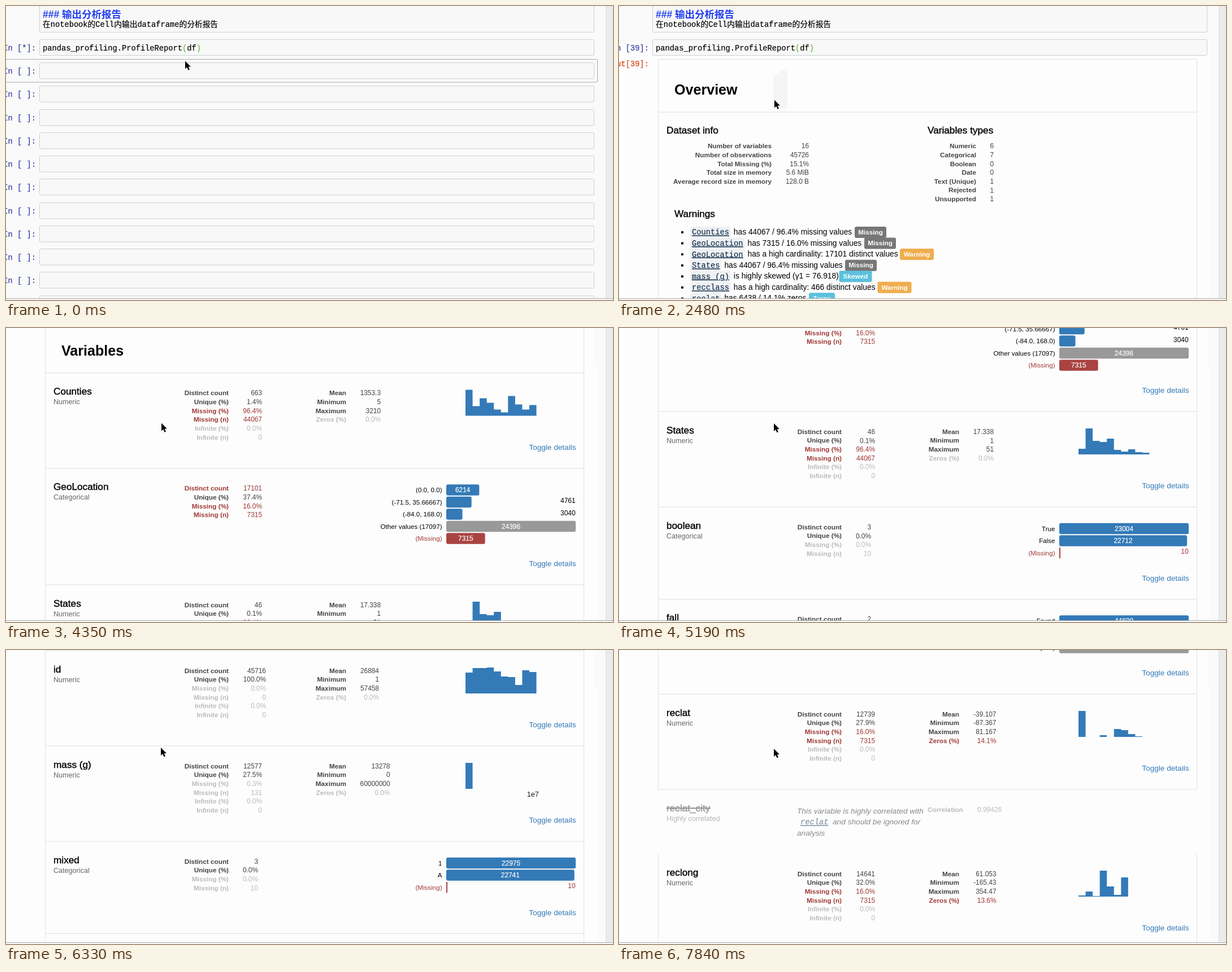
An HTML page for the animation above (7.99 s loop, 1074 px wide and 521 px high).

```html
<!DOCTYPE html>
<html lang="zh-CN">
<head>
<meta charset="utf-8">
<title>Profile report</title>
<style>
html, body { margin: 0; width: 100%; height: 100%; overflow: hidden; background: #fafafa; }
svg { display: block; width: 1074px; height: 521px; }
text { font-family: "Liberation Sans", "Noto Sans CJK SC", "Noto Sans CJK", sans-serif; white-space: pre; }
.mono { font-family: "Liberation Mono", "Noto Sans CJK SC", "Noto Sans CJK", monospace; }
.medium { stroke: currentColor; stroke-width: .4px; }
.firm { stroke: currentColor; stroke-width: .2px; }
</style>
</head>
<body>
<svg id="stage" viewBox="0 0 1074 521"></svg>
<script>
const LOOP = 7990, REPORT_AT = 1980;
const BLUE = '#337ab7', RED = '#a03836', PALE = '#bbb', DARK = '#444';
const TONES = { k: DARK, r: RED, g: PALE };

// y is the middle of the capitals
const text = (x, y, str, size, { fill = '#000', anchor = 'start', weight = 400, cls = '', extra = '' } = {}) =>
  `<text x="${x}" y="${y + size * .36}" font-size="${size}" fill="${fill}" color="${fill}" text-anchor="${anchor}" font-weight="${weight}" class="${cls}" ${extra}>${str}</text>`;
const rect = (x, y, w, h, fill, extra = '') =>
  `<rect x="${x}" y="${y}" width="${w}" height="${h}" fill="${fill}" ${extra}/>`;
const line = (x1, y1, x2, y2, stroke = '#dfdfdf') =>
  `<path d="M${x1} ${y1}L${x2} ${y2}" stroke="${stroke}" fill="none"/>`;
const divider = y => line(70, y, 1022, y);
const mono = (x, y, str, opts = {}) => text(x, y, str, 13.72, { ...opts, cls: 'mono firm' });
const heading = (x, y, str) => text(x, y, str, 17.2, { cls: 'medium' });
const inputBox = (y, h) => rect(59.5, y, 981, h, '#f8f8f8', 'rx="2" stroke="#cfcfcf"');
const prompt = (y, str, fill = '#303f9f') => mono(53, y, str, { fill, anchor: 'end' });

function table(labelX, valueX, y, labels, values, tones) {
  return values.map((value, i) => {
    const rowY = y + i * 15.65, fill = TONES[tones[i]];
    return text(labelX, rowY, labels[i], 11.75, { fill, anchor: 'end', weight: 700 }) +
      text(valueX, rowY, value, 11.9, { fill, anchor: 'end' });
  }).join('');
}

// ---- notebook cells ----
function notebookTop() {
  return inputBox(-20.5, 67) +
    text(65, 14.5, '### 输出分析报告', 17.5, { fill: '#2440f0', weight: 700 }) +
    mono(65, 32.5, '在notebook的Cell内输出dataframe的分析报告') +
    inputBox(59.5, 28) +
    mono(65, 74, 'pandas_profiling.ProfileReport<tspan fill="#4fae3a" stroke="none">(</tspan>df<tspan fill="#4fae3a" stroke="none">)</tspan>');
}

function emptyCells() {
  let out = prompt(74, 'In [*]:') + rect(-10, 94.5, 1056.5, 40.5, '#fafafa', 'rx="2" stroke="#ababab"');
  for (let i = 0; i < 11; i++) {
    const y = 100.5 + Math.round(i * 41.25);
    out += inputBox(y, 28.5) + prompt(y + 14.5, 'In [ ]:');
  }
  return out;
}

// ---- report overview ----
const BADGES = { Missing: ['#777', 56], Warning: ['#f0ad4e', 60], Skewed: ['#5bc0de', 58], Zeros: ['#5bc0de', 46], Rejected: [BLUE, 63] };
const WARNINGS = [
  ['Counties', 'has 44067 / 96.4% missing values', 'Missing', 417],
  ['GeoLocation', 'has 7315 / 16.0% missing values', 'Missing', 434],
  ['GeoLocation', 'has a high cardinality: 17101 distinct values', 'Warning', 497],
  ['States', 'has 44067 / 96.4% missing values', 'Missing', 400],
  ['mass (g)', 'is highly skewed (γ1 = 76.918)', 'Skewed', 389.5],
  ['recclass', 'has a high cardinality: 466 distinct values', 'Warning', 457.5],
  ['reclat', 'has 6438 / 14.1% zeros', 'Zeros', 336],
  ['reclat', 'has 7315 / 16.0% missing values', 'Missing', 392],
  ['reclat_city', 'is highly correlated with', 'Rejected', 520.5],
  ['reclong', 'has 6214 / 13.6% zeros', 'Zeros', 343.5],
  ['reclong', 'has 7315 / 16.0% missing values', 'Missing', 400.5],
  ['year', 'is an unsupported type, check if it needs cleaning or further analysis', 'Warning', 590],
];
const token = (x, y, name) =>
  rect(x - 3, y - 9.5, name.length * 8.23 + 6, 19, '#eff1f3', 'rx="3"') +
  mono(x, y, name, { fill: '#17324f', extra: 'text-decoration="underline"' });

function warning([name, message, badge, badgeX], i) {
  const y = 400 + i * 19.56, [color, width] = BADGES[badge];
  let out = `<circle cx="112" cy="${y + 1}" r="2.2"/>` + token(129, y + .5, name) +
    text(129 + name.length * 8.23 + 8, y, message, 13.8);
  if (badge === 'Rejected') out += token(380, y + .5, 'reclat') + text(436, y, '(ρ = 0.99426)', 13.8);
  return out + rect(badgeX, y - 9, width, 20, color, 'rx="3"') +
    text(badgeX + width / 2, y + .5, badge, 11.75, { fill: '#fff', anchor: 'middle', weight: 700 });
}

function overview() {
  const info = ['Number of variables', 'Number of observations', 'Total Missing (%)', 'Total size in memory', 'Average record size in memory'];
  const types = ['Numeric', 'Categorical', 'Boolean', 'Date', 'Text (Unique)', 'Rejected', 'Unsupported'];
  return divider(94.5) + text(98, 148, 'Overview', 25.1, { weight: 700 }) + divider(188) +
    heading(84, 220, 'Dataset info') + heading(546, 220, 'Variables types') +
    table(270, 336, 248, info, ['16', '45726', '15.1%', '5.6 MiB', '128.0 B'], 'kkkkk') +
    table(632, 663, 248, types, [...'6700111'], 'kkkkkkk') +
    heading(98, 368, 'Warnings') + WARNINGS.map(warning).join('') +
    rect(70, 660.7, 952, 1.6, '#ddd') + text(98, 715.5, 'Variables', 25.1, { weight: 700 });
}

// ---- report variables ----
const COUNTS = ['Distinct count', 'Unique (%)', 'Missing (%)', 'Missing (n)', 'Infinite (%)', 'Infinite (n)'];
const RANGE = ['Mean', 'Minimum', 'Maximum', 'Zeros (%)'];

const title = (y, name, kind) => heading(84, y + 32.5, name) +
  text(84, y + 51, kind, 12.6, { fill: '#666' });
const toggle = y => text(1008.5, y, 'Toggle details', 13.6, { fill: BLUE, anchor: 'end' });

// One outline for all bars, so that no seams show between them
function histogram(bottom, heights) {
  const steps = heights.map((h, i) => `V${bottom - h}H${813 + (i + 1) * 12.55}`).join('');
  return `<path d="M813 ${bottom}${steps}V${bottom}Z" fill="${BLUE}"/>`;
}

const numeric = (name, countX, counts, tones, rangeX, range, rangeTones, heights, scale = '') => ({
  height: 169,
  draw: y => title(y, name, 'Numeric') +
    table(394, countX, y + 35.5, COUNTS, counts.split(' '), tones) +
    table(602, rangeX, y + 35.5, RANGE, range.split(' '), rangeTones) +
    histogram(y + 76, heights) +
    (scale && text(943, y + 85.5, scale, 12.8, { fill: '#222', anchor: 'end' })) + toggle(y + 131.5),
});

function categorical(name, countX, counts, tones, bars) {
  const last = 38.5 + (bars.length - 1) * 21.5;
  const max = Math.max(...bars.map(bar => bar[1]));
  const drawBar = ([label, count], top, i) => {
    const y = top + 38.5 + i * 21.5, width = Math.max(2, count / max * 229);
    const missing = label === '(Missing)';
    const color = missing ? '#a94442' : label.startsWith('Other') ? '#999' : BLUE;
    return text(771.5, y, label, 11.6, { fill: missing ? RED : '#000', anchor: 'end' }) +
      rect(779, y - 9.75, width, 19.5, color, `rx="${Math.min(3, width / 3)}"`) +
      (width > 50 ? text(779 + width / 2, y, count, 11.9, { fill: '#fff', anchor: 'middle', cls: 'firm' })
        : text(1007.5, y - 2.7, count, 11.9, { fill: missing ? RED : '#000', anchor: 'end' }));
  };
  return {
    height: last + 82,
    draw: y => title(y, name, 'Categorical') +
      table(394, countX, y + 35.5, COUNTS, counts.split(' '), tones) +
      bars.map((bar, i) => drawBar(bar, y, i)).join('') + toggle(y + last + 44.5),
  };
}

const unique = {
  height: 150,
  draw: y => title(y, 'name', 'Categorical, Unique') +
    [[315, 'First 3 values', 'Stone Hill'], [546, 'Last 3 values', 'Grey Field']].map(([x, label, value]) =>
      text(x, y + 35.5, label, 11.75, { fill: DARK, weight: 700 }) +
      [1, 2, 3].map(n => text(x, y + 35.5 + n * 15.65, `${value} ${n}`, 11.9, { fill: DARK })).join('')).join('') +
    toggle(y + 112.5),
};

const rejected = {
  height: 114,
  open: true,
  draw: y => {
    const note = (x, dy, str) => text(x, y + dy, str, 13.7, { fill: '#888', extra: 'font-style="italic"' });
    return rect(69, y + 1, 955, 113, '#fdfdfd') +
      text(84, y + 32.5, 'reclat_city', 17.2, { fill: '#999', cls: 'medium', extra: 'text-decoration="line-through"' }) +
      text(84, y + 51, 'Highly correlated', 12.6, { fill: '#b5b5b5' }) +
      note(315, 38, 'This variable is highly correlated with') +
      mono(321, y + 57.5, 'reclat', { fill: '#8490a0', extra: 'font-style="italic" text-decoration="underline"' }) +
      note(378, 57.5, 'and should be ignored for') + note(315, 77, 'analysis') +
      text(546, y + 35.5, 'Correlation', 11.75, { fill: PALE, weight: 700 }) +
      text(677, y + 35.5, '0.99426', 11.9, { fill: PALE, anchor: 'end' });
  },
};

const VARIABLES = [
  numeric('Counties', 453, '663 1.4% 96.4% 44067 0.0% 0', 'kkrrgg', 663, '1353.3 5 3210 0.0%', 'kkkg', [46, 17, 31, 23, 11, 6, 35, 20, 11, 19]),
  categorical('GeoLocation', 453, '17101 37.4% 16.0% 7315', 'rkrr',
    [['(0.0, 0.0)', 6214], ['(-71.5, 35.66667)', 4761], ['(-84.0, 168.0)', 3040], ['Other values (17097)', 24396], ['(Missing)', 7315]]),
  numeric('States', 453, '46 0.1% 96.4% 44067 0.0% 0', 'kkrrgg', 663, '17.338 1 51 0.0%', 'kkkg', [10, 46, 24, 22, 28, 8, 5, 9, 4, 3]),
  categorical('boolean', 446, '3 0.0% 0.0% 10', 'kkgg', [['True', 23004], ['False', 22712], ['(Missing)', 10]]),
  categorical('fall', 446, '2 0.0% 0.0% 0', 'kkgg', [['Found', 44609], ['Fell', 1117]]),
  numeric('id', 460, '45716 100.0% 0.0% 0 0.0% 0', 'kkgggg', 660, '26884 1 57458 0.0%', 'kkkg', [37, 45, 45, 46, 39, 30, 29, 15, 41, 38]),
  numeric('mass (g)', 453, '12577 27.5% 0.3% 131 0.0% 0', 'kkgggg', 679.5, '13278 0 60000000 0.0%', 'kkkg', [46], '1e7'),
  categorical('mixed', 446, '3 0.0% 0.0% 10', 'kkgg', [['1', 22975], ['A', 22741], ['(Missing)', 10]]),
  unique,
  categorical('nametype', 446, '2 0.0% 0.0% 0', 'kkgg', [['Valid', 45651], ['Relict', 75]]),
  categorical('recclass', 446, '466 1.0% 0.0% 0', 'rkgg', [['L6', 8287], ['H5', 7143], ['L5', 4797], ['Other values (463)', 25499]]),
  numeric('reclat', 453, '12739 27.9% 16.0% 7315 0.0% 0', 'kkrrgg', 667.5, '-39.107 -87.367 81.167 14.1%', 'kkkr', [46, 0, 0, 3, 0, 14, 12, 5, 1]),
  rejected,
  numeric('reclong', 453, '14641 32.0% 16.0% 7315 0.0% 0', 'kkrrgg', 667.5, '61.053 -165.43 354.47 13.6%', 'kkkr', [2, 9, 1, 46, 18, 3, 34]),
];

function report() {
  let y = 755;
  const sections = VARIABLES.map(section => {
    const drawn = section.draw(y);
    y += section.height;
    return drawn + (section.open ? '' : divider(y));
  });
  return prompt(74, 'In [39]:') + prompt(102.5, 'Out[39]:', '#d84315') +
    line(69.5, 94, 69.5, y, '#e2e2e2') + line(1022.5, 94, 1022.5, y, '#e2e2e2') +
    overview() + divider(755) + sections.join('');
}

// ---- stage ----
document.getElementById('stage').innerHTML =
  rect(0, 0, 1074, 521, '#fafafa') +
  `<g id="paper">${rect(0, 68, 1047, 450, '#fdfdfd')}</g>` +
  `<g id="paperTop">${rect(0, 0, 1041, 90, '#fdfdfd')}</g>` +
  `<g id="page">${notebookTop()}<g id="cells">${emptyCells()}</g><g id="report">${report()}</g></g>` +
  '<path id="trail" d="M284 115H298V182H273V122H284Z" fill="#f5f5f5"/>' +
  rect(1061, 0, 13, 518, '#ebebeb') + line(1061.5, 0, 1061.5, 518, '#ddd') +
  rect(0, 518, 1074, 3, '#fcfcfc') + line(0, 518.5, 1074, 518.5, '#a6a6a6') +
  '<path id="cursor" d="M0 0V14L3.2 11L5.5 16.3L7.9 15.3L5.7 10.3L9.9 10Z" stroke="#fff" stroke-width="1.2" paint-order="stroke"/>';

const part = Object.fromEntries(['paper', 'paperTop', 'page', 'cells', 'report', 'trail', 'cursor']
  .map(id => [id, document.getElementById(id)]));

// Bursts: start, end, number of steps, value reached
const SCROLL = [
  [2600, 3030, 6, 192.5], [3480, 3900, 5, 652.7], [4350, 4810, 6, 960], [5190, 5680, 6, 1262.5], [6040, 6330, 4, 1604],
  [6480, 6480, 1, 1609], [6870, 7140, 4, 2215], [7280, 7400, 2, 2250], [7660, 7840, 3, 2505.5],
];
const CURSOR_X = [[120, 240, 2, 314], [660, 960, 6, 287], [2340, 2340, 1, 286], [2480, 2480, 1, 275], [5190, 5190, 1, 274]];
const CURSOR_Y = [[660, 960, 6, 107], [2340, 2340, 1, 115], [2480, 2480, 1, 166.5], [4350, 4350, 1, 168.5],
  [5190, 5680, 4, 172], [6040, 6040, 1, 173], [7280, 7280, 1, 175]];

function steppedValue(time, value, bursts) {
  for (const [start, end, steps, goal] of bursts) {
    if (time < start) break;
    const gap = (end - start) / Math.max(1, steps - 1);
    const done = gap ? Math.min(steps, Math.floor((time - start) / gap + 1e-6) + 1) / steps : 1;
    value += (goal - value) * done * done * (3 - 2 * done);
  }
  return value;
}

const show = (node, visible) => node.setAttribute('display', visible ? 'inline' : 'none');

function render(time) {
  const scroll = steppedValue(time, 0, SCROLL);
  const ready = time >= REPORT_AT;
  show(part.cells, !ready);
  show(part.report, ready);
  show(part.paper, ready);
  show(part.paperTop, scroll > 0);
  show(part.trail, time >= 2480 && time < 2600);
  part.page.setAttribute('transform', `translate(0 ${-scroll})`);
  part.cursor.setAttribute('transform',
    `translate(${steppedValue(time, 317, CURSOR_X)} ${steppedValue(time, 97.5, CURSOR_Y)})`);
}

const began = performance.now();
function tick() {
  render((performance.now() - began) % LOOP);
  requestAnimationFrame(tick);
}
tick();
</script>
</body>
</html>
```
